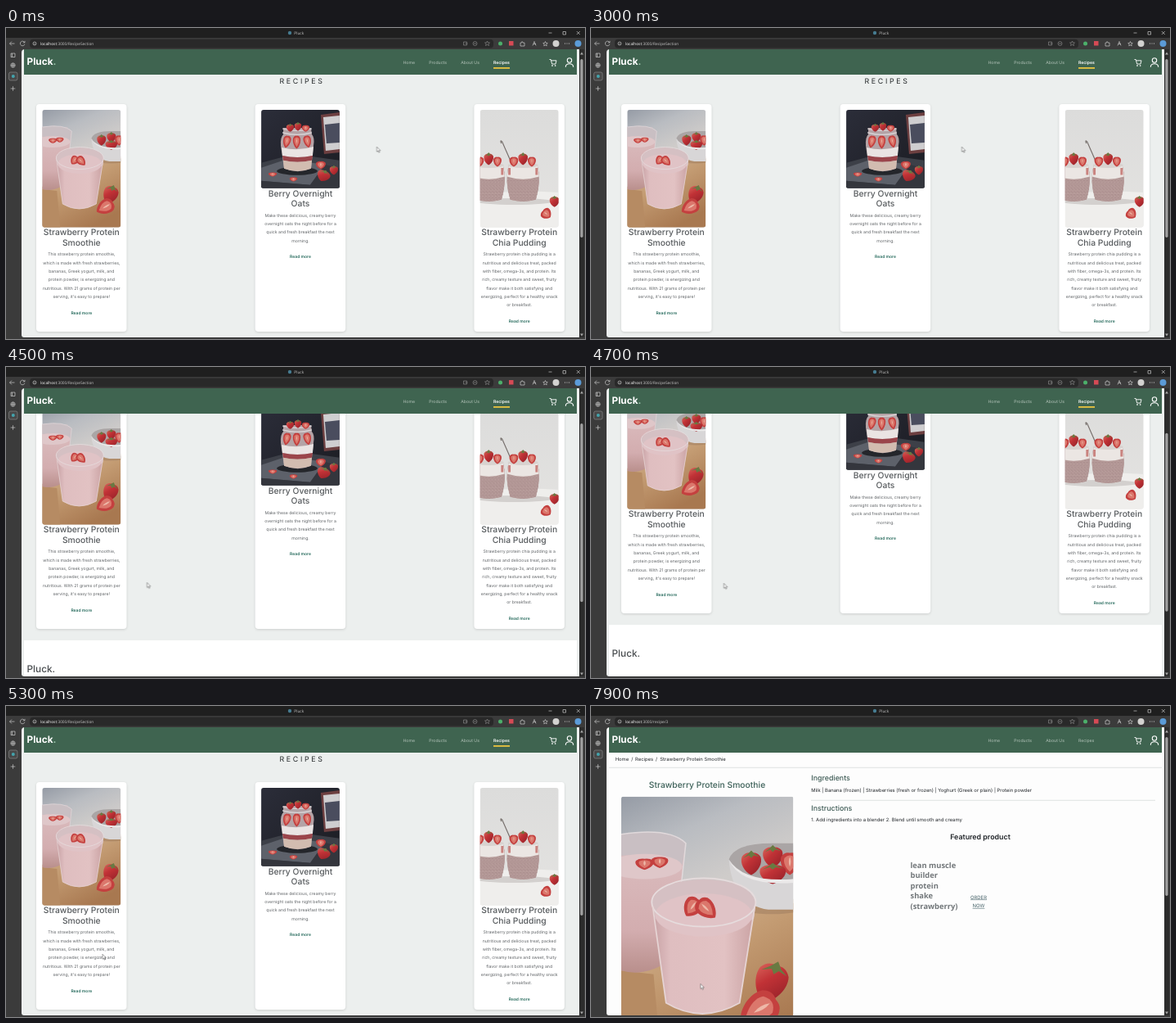
Animation of 708x380 px, one loop 8000 ms. Source, as an HTML page:

```html
<!DOCTYPE html>
<html lang="en">
<head>
<meta charset="utf-8">
<title>Recipes</title>
<style>
html, body { margin: 0; width: 100%; height: 100%; overflow: hidden; background: #3b3b3b; }
svg { display: block; }
#stage { width: 100vw; height: 100vh; }
text { font-family: Inter, sans-serif; font-size: 5.16px; fill: #606467; text-rendering: geometricPrecision; }
.mid { text-anchor: middle; }
.ui, .ui tspan { font-family: "Open Sans", sans-serif; font-size: 4.8px; fill: #c4c4c4; }
.ui .host { fill: #fff; }
.title { font-size: 10.33px; font-weight: 500; fill: #565a5d; }
.green { fill: #3d6159; }
.link { font-size: 5px; font-weight: 600; fill: #23685a; }
.brand { font-size: 11.8px; font-weight: 700; fill: #fff; }
.nav { fill: #b4c4ba; }
.on { fill: #fff; font-weight: 600; }
.head { font-size: 8.85px; font-weight: 500; fill: #3d5a54; }
.copy { font-size: 5.92px; fill: #212529; }
.alt { font: 700 9.35px "Open Sans", sans-serif; fill: #72777a; }
.order { fill: #49656b; text-decoration: underline; }
.card { fill: #fff; filter: drop-shadow(0 1px 1.5px #0002); }
.line { fill: none; stroke: #c8c8c8; stroke-width: .7; }
.dim { stroke: #858585; }

/* 1.25% is one tenth of a second */
@property --scroll { syntax: "<number>"; inherits: true; initial-value: 0; }
.list, .detail, .hover, .arrow, .hand, .cursor { animation: 8s step-end infinite; }
.list { animation-name: leave, scroll; }
.detail { animation-name: enter; }
.hover { animation-name: hover; }
.cursor { animation-name: move; }
.arrow { animation-name: arrow; }
.hand { animation-name: hand; }
.scrolled { transform: translateY(calc(var(--scroll) * -1px)); }
.thumb { transform: translateY(calc(var(--scroll) * .61px)); }
@keyframes leave { 0% { visibility: visible } 87.5%, to { visibility: hidden } }
@keyframes enter { 0% { visibility: hidden } 87.5%, to { visibility: visible } }
@keyframes hover {
  0% { fill: #23685a; text-decoration: none }
  72.5%, to { fill: #1b2124; text-decoration: underline }
}
@keyframes scroll {
  0%, 53.75% { --scroll: 0 }
  55% { --scroll: 20 }
  56.25% { --scroll: 51 }
  57.5% { --scroll: 72 }
  58.75% { --scroll: 70 }
  60% { --scroll: 38 }
  61.25% { --scroll: 11 }
  62.5% { --scroll: 2 }
  63.75%, to { --scroll: 0 }
}
@keyframes move {
  0% { transform: translate(453.5px, 145px) }
  41.25% { transform: translate(518px, 137px) }
  48.75% { transform: translate(338px, 224px) }
  51.25% { transform: translate(240px, 250px) }
  52.5% { transform: translate(182px, 262px) }
  53.75% { transform: translate(173.5px, 262.8px) }
  56.25% { transform: translate(172.5px, 263.2px); animation-timing-function: steps(4) }
  61.25% { transform: translate(152.5px, 265px); animation-timing-function: steps(4) }
  66.25% { transform: translate(118px, 303px); animation-timing-function: steps(5) }
  72.5% { transform: translate(97.5px, 348.5px) }
  98.75%, to { transform: translate(134px, 339.3px) }
}
@keyframes arrow { 0% { opacity: 1 } 72.5% { opacity: 0 } 98.75%, to { opacity: 1 } }
@keyframes hand { 0% { opacity: 0 } 72.5% { opacity: 1 } 98.75%, to { opacity: 0 } }
</style>
</head>
<body>
<svg id="stage" viewBox="0 0 708 380">
  <defs>
    <clipPath id="page"><path d="M19 30a4 4 0 0 1 4-4H701V378H22a3 3 0 0 1-3-3z"/></clipPath>
    <clipPath id="tall"><rect width="96" height="143.5" rx="3"/></clipPath>
    <clipPath id="square"><rect width="96" height="96" rx="3"/></clipPath>
    <clipPath id="large"><rect x="37" y="110.5" width="210.5" height="315" rx="3"/></clipPath>
    <linearGradient id="wall" x2=".3" y2="1">
      <stop stop-color="#959ba5"/><stop offset=".22" stop-color="#b9bcc1"/><stop offset=".45" stop-color="#cfccca"/>
    </linearGradient>
    <linearGradient id="wood" x2=".6" y2="1">
      <stop stop-color="#d8bd9e"/><stop offset=".5" stop-color="#c39b72"/><stop offset="1" stop-color="#a87850"/>
    </linearGradient>
    <linearGradient id="shake">
      <stop stop-color="#c6a0a3"/><stop offset=".18" stop-color="#dfbec0"/>
      <stop offset=".7" stop-color="#e2c2c3"/><stop offset="1" stop-color="#c9a1a2"/>
    </linearGradient>
    <linearGradient id="back" x2="0" y2="1">
      <stop stop-color="#dcc0c2"/><stop offset=".7" stop-color="#d3adaf"/><stop offset="1" stop-color="#b98f8c"/>
    </linearGradient>
    <linearGradient id="night" x2="1" y2="1">
      <stop stop-color="#2b2d39"/><stop offset="1" stop-color="#1b1c22"/>
    </linearGradient>
    <linearGradient id="studio" x2="0" y2="1">
      <stop stop-color="#dcdcdb"/><stop offset="1" stop-color="#e4e3e1"/>
    </linearGradient>
    <linearGradient id="flesh" x2="1" y2="1">
      <stop stop-color="#d9655c"/><stop offset=".4" stop-color="#c13236"/><stop offset="1" stop-color="#8f1f27"/>
    </linearGradient>
    <pattern id="seeds" width="4" height="4" patternUnits="userSpaceOnUse">
      <path d="M.5 1h1M2.6 2.8h1M3 .4h.6M.8 3.2h.7" stroke="#79585c" stroke-width=".8"/>
    </pattern>
    <symbol id="berry" viewBox="0 0 20 20" preserveAspectRatio="none">
      <path d="M10 19.5C4 17 0 10 2 5Q5 1 10 2Q15 1 18 5C20 10 16 17 10 19.5z" fill="url(#flesh)"/>
      <path d="M3 6L7 3 10 0 13 3 17 5 12 4 10 6 8 4z" fill="#687a42"/>
    </symbol>
    <symbol id="half" viewBox="0 0 20 20" preserveAspectRatio="none">
      <path d="M10 19.5C4 17 0 10 2 5Q5 1 10 2Q15 1 18 5C20 10 16 17 10 19.5z" fill="#c4403f"/>
      <path d="M10 17Q3 11 5 6Q10 2 15 6Q17 11 10 17z" fill="#db776c"/>
      <path d="M10 13Q8 9 10 5Q12 9 10 13z" fill="#eeb8a8"/>
    </symbol>
    <symbol id="smoothie" viewBox="0 0 96 143.5">
      <rect width="96" height="144" fill="url(#wall)"/>
      <path d="M0 94L30 70 62 59 96 57V144H0z" fill="url(#wood)"/>
      <path d="M0 97L18 99 22 144H0z" fill="#b68b63"/>
      <ellipse cx="84" cy="62" rx="18" ry="3.5" fill="#9d7d5f" opacity=".5"/>
      <path d="M60 35Q62 60 82 63H96V27z" fill="#d8d6d7"/>
      <path d="M60 35Q63 26 84 26H96V46Q68 51 60 35z" fill="#aaa5a5"/>
      <use href="#berry" x="66" y="30" width="13" height="14"/>
      <use href="#berry" x="78" y="27" width="13" height="13"/>
      <use href="#half" x="88" y="30" width="12" height="14"/>
      <use href="#berry" x="76" y="37" width="17" height="12"/>
      <path d="M60 35Q66 50 96 48L96 46Q68 48 60 35z" fill="#ebe9e9"/>
      <path d="M0 21Q27 17 36 26L29 90Q14 101 0 97z" fill="url(#back)"/>
      <path d="M0 21Q27 17 36 26L34 38Q17 31 0 33z" fill="#c9bfc3"/>
      <ellipse cx="13" cy="39" rx="21" ry="7" fill="#dfc7c9"/>
      <path d="M0 21Q27 17 36 26L29 90" fill="none" stroke="#e0d9db" stroke-width=".7"/>
      <use href="#half" x="7" y="34" width="12" height="7"/>
      <use href="#half" x="16" y="33" width="11" height="7"/>
      <path d="M17 60L25 115Q45 127 66 115L75 60Q47 40 17 60z" fill="url(#shake)"/>
      <path d="M17 59Q20 47 46 46Q72 47 75 59L74 68Q47 83 19 68z" fill="#d5c0c3"/>
      <ellipse cx="46" cy="66" rx="27" ry="12" fill="#e0c3c6"/>
      <ellipse cx="46" cy="59" rx="29" ry="13.5" fill="none" stroke="#e6dcdd" stroke-width=".8"/>
      <path d="M17.500 61L25 115Q45 127 66 115L74.500 61" fill="none" stroke="#e6d4d4" stroke-width=".8"/>
      <use href="#half" x="34" y="55" width="12" height="13" transform="rotate(35 40 61)"/>
      <use href="#half" x="41" y="55" width="12" height="15" transform="rotate(-45 47 62)"/>
      <use href="#berry" x="73" y="91" width="21" height="25" transform="rotate(20 83 103)"/>
      <use href="#half" x="67" y="105" width="21" height="26" transform="rotate(60 77 118)"/>
    </symbol>
    <symbol id="oats" viewBox="0 0 96 96">
      <rect width="96" height="96" fill="url(#night)"/>
      <path d="M73 6L96 3V52L77 54z" fill="#6d3f40"/>
      <path d="M76 9L96 7V48L79 50z" fill="#cfced0"/>
      <path d="M78 18L96 16V40L80 41z" fill="#4a4d5e"/>
      <path d="M0 65L40 54 96 62V96H0z" fill="#3d4048"/>
      <path d="M0 71L30 61 78 67 60 92 0 87z" fill="#5d616a"/>
      <path d="M0 87L60 92 78 67 96 72V96H0z" fill="#34363d"/>
      <ellipse cx="44" cy="75" rx="25" ry="5" fill="#24262b"/>
      <path d="M27 22H61L62 30Q66 34 64 44L61 72Q45 79 28 72L24 44Q23 34 27 30z" fill="#b4a3a6"/>
      <path d="M25 46Q45 51 64 45L63 56Q44 60 26 56z" fill="#eae4e3"/>
      <path d="M26 56Q44 60 63 56L62 62Q44 66 27 62z" fill="#9b454b"/>
      <path d="M27 62Q44 66 62 62L61 72Q44 78 28 72z" fill="#d2bcb0"/>
      <use href="#half" x="26" y="30" width="11" height="17" transform="rotate(12 31 38)"/>
      <use href="#half" x="38" y="30" width="11" height="18"/>
      <use href="#half" x="51" y="30" width="11" height="17" transform="rotate(-12 56 38)"/>
      <path d="M26 23Q44 28 62 23M26 28Q44 33 62 28" fill="none" stroke="#dad6d8" stroke-width="1.2"/>
      <use href="#berry" x="30" y="17" width="11" height="10"/><use href="#berry" x="40" y="15" width="10" height="11"/><use href="#half" x="49" y="18" width="11" height="9"/>
      <use href="#half" x="66" y="62" width="14" height="11"/>
      <use href="#berry" x="67" y="73" width="19" height="15" transform="rotate(25 76 80)"/>
      <use href="#berry" x="83" y="68" width="12" height="12"/>
      <use href="#half" x="8" y="76" width="12" height="6"/>
      <use href="#half" x="34" y="82" width="11" height="6"/>
    </symbol>
    <symbol id="jar" viewBox="0 0 44 60" preserveAspectRatio="none" overflow="visible">
      <path id="glass" d="M4 17H40Q45 35 38 57Q22 61 6 57Q-1 35 4 17z" fill="#b89d9b"/>
      <use href="#glass"/><path d="M2 31Q22 36 42 31Q43 45 38 57Q22 61 6 57Q1 45 2 31z" fill="url(#seeds)" opacity=".6"/>
      <path d="M4 17H40L42 30Q22 36 2 30z" fill="#ebe6e3"/>
      <path d="M5 20V28M39 20V28" stroke="#c9837f" stroke-width="3"/>
      <ellipse cx="22" cy="17" rx="19" ry="3" fill="#d8d2cf"/>
      <use href="#half" x="4" y="6" width="13" height="13"/><use href="#berry" x="15" y="2" width="14" height="15"/><use href="#half" x="27" y="6" width="12" height="13"/>
    </symbol>
    <symbol id="pudding" viewBox="0 0 96 143.5">
      <rect width="96" height="144" fill="url(#studio)"/>
      <path d="M0 103Q50 97 96 101V144H0z" fill="#efeeec"/>
      <ellipse cx="42" cy="112" rx="47" ry="4" fill="#d3d0ce"/>
      <path d="M26 41Q24 36 27 39L38 64" fill="none" stroke="#77706d" stroke-width="1.2"/>
      <use href="#jar" x="-11" y="50" width="43" height="63"/>
      <use href="#jar" x="31" y="50" width="43" height="63"/>
      <use href="#berry" x="84" y="105" width="14" height="14"/>
      <use href="#half" x="73" y="120" width="16" height="14" transform="rotate(-50 81 127)"/>
    </symbol>
  </defs>

  <!-- browser frame -->
  <rect width="708" height="380" fill="#3b3b3b"/>
  <rect width="708" height="12" fill="#1f1f1f"/>
  <circle cx="347" cy="6" r="2.2" fill="#467c91"/>
  <text class="ui" x="352.3" y="7.7">Pluck</text>
  <path class="line" d="M663.5 6h4M681 4.5h3.5V8H681zM697.8 4l4 4m0-4l-4 4"/>
  <rect x="29" y="13.8" width="567" height="10.6" rx="4" fill="#292929"/>
  <g class="line">
    <path d="M10.5 19H4.5l2.5-2.5M4.5 19l2.5 2.5M22.7 17.7a2.8 2.8 0 1 0 .2 2M23 15.8v2h-2"/>
    <circle cx="35" cy="19" r="2"/><path d="M35 18.7v1.3"/>
    <path d="M629 18h1.5q.5-3 1.5 0h2v4h-5zM644 21.5l2-5 2 5M645 19.500h3M659.500 16.500l.8 1.800 2 .2-1.500 1.300.4 2-1.700-1-1.700 1 .4-2-1.500-1.300 2-.2z"/>
    <path d="M6 31h5v4.5H6zM7.5 31v4.5M8.5 71.2v5.6M5.7 74h5.6"/>
    <circle cx="8.5" cy="45.5" r="2.7"/><path d="M6 45.5h5M8.5 43q-2 2.5 0 5 2-2.5 0-5"/>
  </g>
  <g class="line dim">
    <path d="M559.5 17h4v4h-4zM561.5 19h3M572 19h3M588.5 16l1 2h2l-1.600 1.500.6 2-2-1.200-2 1.200.6-2-1.600-1.500h2z"/>
    <circle cx="573.5" cy="19" r="2.5"/>
    <rect x="3.500" y="54" width="10.500" height="10" rx="2" fill="#484848"/>
  </g>
  <circle cx="604.5" cy="19" r="2.5" fill="#4caf6a"/>
  <rect x="615" y="16" width="5.5" height="5.5" fill="#d64a55"/>
  <circle cx="672.5" cy="19" r="4" fill="#d3d2d0"/>
  <path d="M683 19h1m1.500 0h1m1.500 0h1" stroke="#ccc"/>
  <circle cx="699.5" cy="19" r="4" fill="#5b9bd8"/>
  <circle cx="8.800" cy="59" r="2" fill="#43a4ad"/>
  <rect x="701" y="26" width="6" height="352" fill="#2c2c2c"/>
  <path d="M702 32.5l2-3 2 3zM702 373.500l2 3 2-3z" fill="#a5a5a5"/>

  <!-- recipe list -->
  <g class="list">
    <text class="ui" x="42" y="20.7"><tspan class="host">localhost</tspan>:3000/RecipeSection</text>
    <rect class="thumb" x="702.2" y="38" width="3.4" height="218" rx="1.7" fill="#a0a0a0"/>
    <g clip-path="url(#page)">
      <rect x="19" y="26" width="682" height="352" fill="#ecefee"/>
      <g class="scrolled">
        <text x="334.5" y="68.2" style="font-size:8.85px;letter-spacing:2.65px;fill:#25292b">RECIPES</text>
        <g id="cards"></g>
        <rect x="22" y="385" width="676" height="195" fill="#fff"/>
        <text class="brand" x="25.5" y="424" style="font-weight:500;fill:#484c4f">Pluck.</text>
      </g>
    </g>
  </g>

  <!-- recipe detail -->
  <g class="detail">
    <text class="ui" x="42" y="20.7"><tspan class="host">localhost</tspan>:3000/recipe/3</text>
    <rect x="702.2" y="38" width="3.4" height="194" rx="1.7" fill="#a0a0a0"/>
    <g clip-path="url(#page)">
      <rect x="19" y="26" width="682" height="352" fill="#fdfdfd"/>
      <path d="M22 75.300H698M269 115.300H690" stroke="#d3d8d6" stroke-width=".7"/>
      <text class="copy" x="29.7" y="66.6">Home</text><text class="copy" x="49.3" y="66.6">/</text>
      <text class="copy" x="54" y="66.6">Recipes</text><text class="copy" x="79" y="66.6">/</text>
      <text class="copy" x="84.3" y="66.6">Strawberry Protein Smoothie</text>
      <text class="title green mid" x="142" y="100.3">Strawberry Protein Smoothie</text>
      <g clip-path="url(#large)"><use href="#smoothie" x="37" y="110.5" width="210.5" height="315"/></g>
      <text class="head" x="269.3" y="91.2">Ingredients</text>
      <text class="copy" x="269.3" y="105">Milk | Banana (frozen) | Strawberries (fresh or frozen) | Yoghurt (Greek or plain) | Protein powder</text>
      <text class="head" x="269.3" y="127.7">Instructions</text>
      <text class="copy" x="269.3" y="141">1. Add ingredients into a blender 2. Blend until smooth and creamy</text>
      <text class="head mid" x="476" y="163" style="font-weight:600;fill:#212529">Featured product</text>
      <g id="product"></g>
    </g>
  </g>

  <!-- site header -->
  <rect x="22" y="26" width="676" height="31" fill="#3f6450"/>
  <text class="brand" x="25.5" y="45.2">Pluck<tspan fill="#9cc4ab">.</tspan></text>
  <text class="nav" x="485.5" y="43.8">Home</text>
  <text class="nav" x="517.2" y="43.8">Products</text>
  <text class="nav" x="556.3" y="43.8">About Us</text>
  <g class="list"><text class="on" x="596" y="43.8">Recipes</text><rect x="596" y="48" width="20" height="1.8" fill="#e9c23f"/></g>
  <g class="detail"><text class="nav" x="596" y="43.8">Recipes</text></g>
  <g fill="none" stroke="#fff" stroke-linejoin="round">
    <path d="M664.5 38.5h1.700l1.500 5.500h4.300l1-4.200h-6.200" stroke-width=".9"/>
    <circle cx="668" cy="46" r=".5"/><circle cx="671.7" cy="46" r=".5"/>
    <circle cx="689" cy="39.500" r="2.7" stroke-width="1.1"/>
    <path d="M684.3 47.800q0-4 4.700-4t4.700 4" stroke-width="1.1"/>
  </g>

  <g class="cursor" stroke="#333" stroke-width=".45" fill="#fff" stroke-linejoin="round">
    <path class="arrow" d="M0 .3V6.300L1.400 5 2.400 7.200 3.400 6.800 2.500 4.700H4.300z"/>
    <path class="hand" d="M-.7 .8Q0-.2 .6 .8V3.500L3.500 4.200Q4.100 4.400 4 5.300L3.300 8.800H-.3L-2.200 5.800Q-2 5-.7 5.800z"/>
  </g>
</svg>
<script>
const PITCH = { title: 12.4, body: 10.3, copy: 10.4 };

function lines(rows, x, y, pitch, cls) {
  return rows.split("|").map((row, i) =>
    `<text class="${cls}" x="${x}" y="${y + i * pitch}">${row}</text>`).join("");
}

function card({ x, photo, height, clip, title, body, link, hover = "" }) {
  const mid = 55.3, top = 100 + height;
  return `<g transform="translate(${x} 0)">
    <rect class="card" y="93" width="110.5" height="278" rx="4"/>
    <g transform="translate(7.3 100)" clip-path="url(#${clip})"><use href="#${photo}" width="96" height="${height}"/></g>
    ${lines(title, mid, top + 9.7, PITCH.title, "title mid")}
    ${lines(body, mid, top + 34.9, PITCH.body, "mid")}
    <text class="link mid ${hover}" x="${mid}" y="${link}">Read more</text></g>`;
}

document.getElementById("cards").innerHTML = [
  { x: 37, photo: "smoothie", height: 143.5, clip: "tall", link: 349.9, hover: "hover",
    title: "Strawberry Protein|Smoothie",
    body: "This strawberry protein smoothie,|which is made with fresh strawberries,|bananas, Greek yogurt, milk, and|protein powder, is energizing and|nutritious. With 21 grams of protein per|serving, it's easy to prepare!" },
  { x: 304.7, photo: "oats", height: 95.8, clip: "square", link: 281.3,
    title: "Berry Overnight|Oats",
    body: "Make these delicious, creamy berry|overnight oats the night before for a|quick and fresh breakfast the next|morning." },
  { x: 572.4, photo: "pudding", height: 143.5, clip: "tall", link: 360,
    title: "Strawberry Protein|Chia Pudding",
    body: "Strawberry protein chia pudding is a|nutritious and delicious treat, packed|with fiber, omega-3s, and protein. Its|rich, creamy texture and sweet, fruity|flavor make it both satisfying and|energizing, perfect for a healthy snack|or breakfast." }
].map(card).join("");

document.getElementById("product").innerHTML =
  lines("lean muscle|builder|protein|shake|(strawberry)", 390.5, 198, PITCH.title, "alt") +
  lines("ORDER|NOW", 474, 235.5, PITCH.copy, "copy mid order");
</script>
</body>
</html>
```
